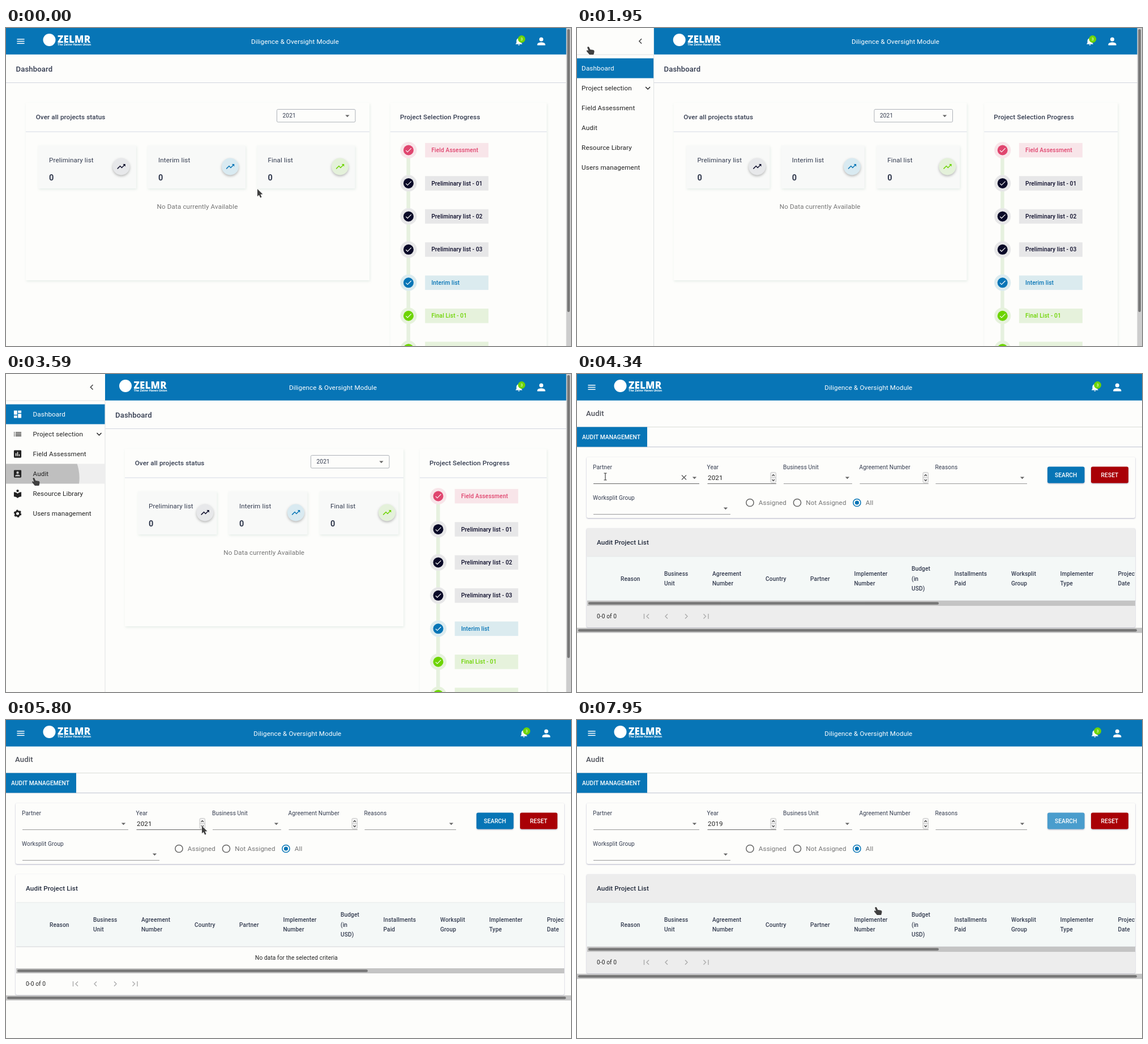
These frames come from a looping animation (998 px wide and 561 px high, 8000 ms). An HTML page:

```html
<!DOCTYPE html>
<html lang="en">
<head>
<meta charset="utf-8">
<title>Dashboard and audit list</title>
<style>
html, body { margin: 0; width: 100%; height: 100%; overflow: hidden; background: #fdfdfb; }
#stage { display: block; width: 998px; height: 561px; }
text { font-family: Roboto, "Liberation Sans", sans-serif; letter-spacing: .009em; white-space: pre; }
.card { filter: drop-shadow(1px 2px 2px #3c78641f); }
.raised { filter: drop-shadow(0 2px 2px #0004); }
.panel { filter: drop-shadow(0 1px 1px #50508070); }
</style>
</head>
<body>
<svg id="stage" viewBox="0 0 998 561"></svg>
<script>
const LOOP = 8000, BLUE = '#0775b6', INK = '#343c50', GREY = '#757575', PAGE = '#fdfdfb';
const PINK = '#e0466f', NAVY = '#0a0a28', GREEN = '#6dd400';
const MID = 'text-anchor="middle"', CAPS = 'letter-spacing=".3"';
const OPEN_AT = 1660, AUDIT_AT = 4270, DATA_AT = 4900, EMPTY_AT = 5700, RELOAD_AT = 7400;

const ICON = {
  menu: 'M3 18h18v-2H3zM3 13h18v-2H3zM3 6v2h18V6z',
  bell: 'M12 22c1.1 0 2-.9 2-2h-4c0 1.1.9 2 2 2zm6-6v-5c0-3.1-1.6-5.6-4.5-6.3V4a1.5 1.5 0 0 0-3 0v.7C7.6 5.4 6 7.9 6 11v5l-2 2v1h16v-1z',
  person: 'M12 12a4 4 0 1 0 0-8 4 4 0 0 0 0 8zm0 2c-2.7 0-8 1.3-8 4v2h16v-2c0-2.7-5.3-4-8-4z',
  trend: 'M16 6l2.3 2.3-4.9 4.9-4-4L2 16.6 3.4 18l6-6 4 4 6.3-6.3L22 12V6z',
  check: 'M9 16.2L4.8 12l-1.4 1.4L9 19 21 7l-1.4-1.4z',
  drop: 'M7 10l5 5 5-5z',
  tiles: 'M3 13h8V3H3zm0 8h8v-6H3zm10 0h8V11h-8zm0-18v6h8V3z',
  list: 'M3 13h2v-2H3zM3 17h2v-2H3zM3 9h2V7H3zM7 13h14v-2H7zM7 17h14v-2H7zM7 7v2h14V7z',
  chart: 'M19 3H5a2 2 0 0 0-2 2v14c0 1.1.9 2 2 2h14a2 2 0 0 0 2-2V5a2 2 0 0 0-2-2zM9 17H7v-7h2zm4 0h-2V7h2zm4 0h-2v-4h2z',
  account: 'M3 5v14c0 1.1.9 2 2 2h14a2 2 0 0 0 2-2V5a2 2 0 0 0-2-2H5a2 2 0 0 0-2 2zm12 4a3 3 0 1 1-6 0 3 3 0 0 1 6 0zm-9 8c0-2 4-3.1 6-3.1s6 1.1 6 3.1v1H6z',
  book: 'M12 11.6C9.6 9.4 6.5 8 3 8v11c3.5 0 6.6 1.4 9 3.6 2.4-2.2 5.5-3.6 9-3.6V8c-3.5 0-6.6 1.4-9 3.6zM12 8a3 3 0 1 0 0-6 3 3 0 0 0 0 6z'
};
const CURSOR = {
  arrow: 'M0 0v13l3-2.4 2.3 4.8 2.3-1.1-2.2-4.7 4.1-.3z',
  hand: 'M-1.2 2c-1.3 0-1.8 1-1.4 2.1L-.8 9l-1.6-.6c-1.6-.5-2.3.9-1.2 2L1 16h7.3l1.2-4.6c.4-2-.4-3.3-1.8-3.6L2.4 7 .4 3.1C0 2.3-.5 2-1.2 2z'
};
const MENU = ['Dashboard', 'Project selection', 'Field Assessment', 'Audit', 'Resource Library', 'Users management'];
const MENU_ICON = ['tiles', 'list', 'chart', 'account', 'book'];
const STEPS = [
  ['Field Assessment', PINK, '#f8e5e9'], ['Preliminary list - 01', NAVY, '#e7e7e8'],
  ['Preliminary list - 02', NAVY, '#e7e7e8'], ['Preliminary list - 03', NAVY, '#e7e7e8'],
  ['Interim list', BLUE, '#dbebef'], ['Final List - 01', GREEN, '#e6f2dc'], ['Final List - 02', GREEN, '#e6f2dc']
];
const COLUMNS = [
  [77, 'Reason'], [154, 'Business|Unit'], [239, 'Agreement|Number'], [333, 'Country'], [412, 'Partner'],
  [489.5, 'Implementer|Number'], [591, 'Budget|(in|USD)'], [666.5, 'Installments|Paid'],
  [767, 'Worksplit|Group'], [853.5, 'Implementer|Type'], [955.5, 'Project|Date']
];
const REASON = 'Project|below Risk|Threshold';
const ROWS = [
  [REASON, 'AFG01', '893', '', 'TAVORI|REVITALIZATION|FELLOWSHIPS|FOR|VELMORISTAN', '1001019', '$0.00', '$0.00', 'Group K', 'LOCALNGO'],
  [REASON, 'AFG01', '894', '', 'UNION OF|NEIGHBOURLY|RESTORATION,|VELMORISTAN', '1001041', '$0.00', '$0.00', 'Group K', 'LOCALNGO']
];
const PATH = [
  [0, 444, 284], [770, 444, 284], [1440, 21, 31], [2680, 21, 31], [3430, 50, 181], [4270, 50, 181],
  [5050, 51.5, 183], [5200, 51.5, 183], [5680, 346, 187], [6430, 346, 187], [6900, 773, 215],
  [7160, 860, 183], [7300, 860, 183], [7900, 529, 328]
];

// SVG helpers; text is placed by its vertical middle
const rect = (x, y, w, h, fill, more = '') => `<rect x="${x}" y="${y}" width="${w}" height="${h}" fill="${fill}" ${more}/>`;
const circle = (x, y, r, fill, more = '') => `<circle cx="${x}" cy="${y}" r="${r}" fill="${fill}" ${more}/>`;
const text = (x, y, s, size = 11.7, fill = INK, weight = 400, more = '') =>
  `<text x="${x}" y="${y + size * .355}" font-size="${size}" fill="${fill}" font-weight="${weight}" ${more}>${s.replace('&', '&amp;')}</text>`;
const lines = (x, y, s, gap, weight) => s.split('|').map((line, i, all) =>
  text(x, y + (i - (all.length - 1) / 2) * gap, line, 10.2, INK, weight)).join('');
const icon = (x, y, name, fill, k = .73) =>
  `<path transform="translate(${x} ${y}) scale(${k}) translate(-12 -12)" d="${ICON[name]}" fill="${fill}" fill-rule="evenodd"/>`;
const stroke = (d, color, width = 1.5) => `<path d="${d}" fill="none" stroke="${color}" stroke-width="${width}"/>`;
const hline = (x, y, w, color, h = 1) => rect(x, y - h / 2, w, h, color);
const mix = (a, b, p) => a + (b - a) * p;
const clamp = u => Math.max(0, Math.min(1, u));
const ease = u => { u = clamp(u); return u * u * (3 - 2 * u); };

function pointer(t) {
  const i = PATH.findIndex(k => k[0] > t);
  if (i < 0) return PATH[PATH.length - 1].slice(1);
  const [a, b] = [PATH[i - 1], PATH[i]], p = ease((t - a[0]) / (b[0] - a[0]));
  return [mix(a[1], b[1], p), mix(a[2], b[2], p)];
}

function header(p, shift) {
  const x = mix(65, 199.5, p), bell = 906 + shift;
  return rect(175 * p, 0, 998, 46.7, BLUE) +
    circle(x + 11.5, 21, 11, '#fff') +
    text(x + 26, 19.5, 'ZELMR', 17, '#fff', 800, 'style="font-family:Open Sans,sans-serif"') +
    text(x + 26, 29, 'The Zelmr Haven Union', 5.5, '#fff', 700) +
    text(mix(510.5, 577.5, p) + shift / 2, 23.5, 'Diligence & Oversight Module', 11.7, '#fff', 400, MID) +
    icon(bell, 23.5, 'bell', '#fff') + circle(bell + 4.8, 19.5, 6.4, GREEN) +
    text(bell + 4.8, 19.5, '3', 7.5, '#fff', 400, MID) +
    icon(bell + 39.5, 23.5, 'person', '#fff', .88) + (p ? '' : icon(26, 23.5, 'menu', '#fff'));
}

const scrollbar = end => rect(989.5, 0, 9, 561, '#cdcdcd') + rect(991.3, 2, 4.7, end - 2, '#777', 'rx="2.3"');
const hscroll = (x, y, w, thumb) => rect(x, y, w, 9, '#c4c4c4') + rect(x + 2, y + 2.2, thumb, 4.6, '#777', 'rx="2.3"');

function dashboard(p) {
  const m = (a, b) => mix(a, b, p);
  const left = m(35, 210), right = m(642, 702), side = m(679, 731), dot = m(711, 763.5), sel = m(478, 538);
  let s = text(m(17.5, 193), 72.5, 'Dashboard', 13.15, INK, 500) + hline(175 * p, 96.5, 989, '#d2d5de') +
    rect(left, 132, right - left, 313, PAGE, 'class="card"') +
    text(left + 17.7, 157, 'Over all projects status', 11.7, INK, 500) + hline(left, 183, right - left, '#d6dae6') +
    rect(sel + .5, 143.5, 138.5, 22.5, PAGE, 'stroke="#adb2b8" rx="2"') + text(sel + 10.5, 154.7, '2021', 10.2) +
    icon(sel + 125, 155, 'drop', '#666');
  const stats = [
    ['Preliminary list', 57, 233, 203.5, 351.5, NAVY, '#e7e8ea'],
    ['Interim list', 250, 393, 396, 512, BLUE, '#d9eaf1'],
    ['Final list', 443.5, 554, 590, 673, GREEN, '#e4f1da']
  ];
  for (const [name, x0, x1, c0, c1, color, tint] of stats) {
    const x = m(x0, x1), c = m(c0, c1);
    s += rect(x, 207, m(173, 139.5), 76, '#f8f9f8', 'class="card"') + text(x + 19, 233.2, name) +
      text(x + 19, 263.8, '0', 14.6, INK, 700) + circle(c, 244.5, 15, tint, 'class="raised"') + icon(c, 244.5, 'trend', color);
  }
  s += text(m(338, 455.7), 315, 'No Data currently Available', 11.7, GREY, 400, MID) +
    rect(side, 132, 955 - side, 440, PAGE, 'class="card"') +
    text(side + 17, 157, 'Project Selection Progress', 11.7, INK, 500) + hline(side, 183, 955 - side, '#d6dae6') +
    rect(dot - 3.5, 216, 6.5, 350, '#e6f1df');
  STEPS.forEach(([name, color, tint], i) => {
    const y = 215.5 + i * 58.45;
    s += circle(dot, y, 14.6, tint) + circle(dot, y, 9, color) + icon(dot, y, 'check', '#fff', .58) +
      rect(dot + 29.2, y - 12.7, 112, 25.5, tint) + text(dot + 40.4, y, name, 10.2, color, 500);
  });
  return s;
}

function sidebar(t, y) {
  let s = rect(0, 0, 175, 561, PAGE) + hline(0, 47, 175, '#dfe2e2') + rect(174.5, 47, 1, 514, '#dfe2e2') +
    stroke('M153.5 19l-4.2 4.3 4.2 4.3', '#444');
  const over = t > 2680 && y > 53.5 ? Math.floor((y - 53.5) / 35) : 0;
  if (over) s += rect(0, 53.5 + over * 35, 174.5, 35, '#eeeeee');
  if (t > 3490 && t < 3970) {
    const r = 12 + 66 * (t - 3490) / 100, fade = .2 * (1 - clamp((t - 3720) / 250));
    s += `<svg y="158.5" width="174.5" height="35">${circle(51, 25, r, '#000', `opacity="${fade}"`)}</svg>`;
  }
  MENU.forEach((name, i) => {
    const cy = 71 + i * 35.05, color = i ? '#222' : '#fff';
    if (!i) s += rect(0, 53.5, 174.5, 35, BLUE);
    s += text(47.5, cy, name, 11.7, color);
    s += MENU_ICON[i] ? icon(20.5, cy, MENU_ICON[i], color) :
      circle(20.5, cy, 4, 'none', `stroke="${color}" stroke-width="3"`) +
      circle(20.5, cy, 5.8, 'none', `stroke="${color}" stroke-width="2" stroke-dasharray="3.2 2.87"`);
  });
  return s + stroke('M160.5 104l4 4 4-4', '#222');
}

const stepper = x => rect(x, 173.5, 9.5, 18.5, '#f1f1f1', 'stroke="#bbb" stroke-width=".8" rx="2"') + hline(x, 182.8, 9.5, '#bbb', .8) +
  stroke(`M${x + 2.6} 179.8l2.2-2.2 2.2 2.2M${x + 2.6} 186.2l2.2 2.2 2.2-2.2`, '#333', 1.2);

function filters(t) {
  const year = t < 6000 ? '2021' : t < 6220 ? '2020' : '2019', focus = t < 5300;
  const fields = [['Partner', 28, 216, 164], ['Year', 229.5, 352, 164], ['Business Unit', 364, 486, 164],
    ['Agreement Number', 498.5, 621, 164], ['Reasons', 632.5, 795, 164], ['Worksplit Group', 28, 271, 218]];
  let s = rect(17, 146.5, 969, 107.5, PAGE, 'rx="3" class="panel"');
  fields.forEach(([name, x, end, y], i) => {
    const dark = i == 1 || (!i && focus);
    s += text(x, y + .5, name, 10.2) + hline(x + 1, y + 29.5, end - x - 1, dark ? '#666' : '#999');
    s += i == 1 || i == 3 ? stepper(end - 10) : icon(end - 8.5, y + 19, 'drop', '#666');
  });
  s += text(231, 182.5, year, 11.7, '#222');
  if (focus) s += stroke('M185 178.5l8 8m0-8l-8 8', '#555', 1.2);
  [['Assigned', 305.5], ['Not Assigned', 389], ['All', 494.5]].forEach(([name, x], i) => {
    const color = i == 2 ? BLUE : '#666';
    s += circle(x, 227, 6.6, 'none', `stroke="${color}" stroke-width="1.5"`) + (i == 2 ? circle(x, 227, 3.6, color) : '') +
      text(x + 15.3, 226.5, name, 11.7, GREY);
  });
  return s + rect(831, 163.5, 65.5, 29, t > 7100 ? '#4a9dcd' : BLUE, 'rx="3" class="panel"') +
    text(863.7, 178.3, 'SEARCH', 10.2, '#fff', 500, MID + ' ' + CAPS) +
    rect(908, 163.5, 66, 29, '#a90006', 'rx="3" class="panel"') + text(941, 178.3, 'RESET', 10.2, '#fff', 500, MID + ' ' + CAPS);
}

function table(t, filled, loading) {
  const top = filled ? 290 : 272, head = top + 50, base = loading ? '#ededed' : PAGE;
  const bottom = filled ? 580 : loading ? 447 : 485, width = filled ? 960 : 969;
  const colX = i => COLUMNS[i][0] + (filled ? (i < 5 ? 17.5 : 42.3) : 0);
  let s = rect(17, top, 969, bottom - top, base, 'rx="3" class="panel"') +
    text(35, top + 24.7, 'Audit Project List', 11.7, '#222a3c', 500);
  if (filled) {
    ROWS.forEach((row, r) => {
      const y = r ? 535.5 : 459;
      s += stroke(`M58 ${y - 3.5}l4 4 4-4`, '#333', 1.7) +
        row.map((cell, i) => lines(colX(i), y, cell, 11.7, 400)).join('');
    });
    const turn = 140 + (t - 5120) * 360 / 1400;
    s += hline(18, 500, width, '#888') +
      circle(515, 563, 18.2, 'none', `stroke="#5560c8" stroke-width="2.7" stroke-dasharray="31.8 200" transform="rotate(${turn} 515 563)"`);
  }
  s += rect(17.5, head, width - .5, 78, '#f4f8f7') + hline(18, head, width, '#e6eaea') + hline(18, head + 78, width, '#d3d6d8') +
    '<svg width="985.5" height="561">' +
    COLUMNS.slice(0, filled ? 10 : 11).map(([, name], i) => lines(colX(i), head + 39, name, 17.5, 500)).join('') + '</svg>';
  if (filled) return s + rect(977, 290, 9, 280, '#c4c4c4') + rect(979.2, 292, 4.7, 280, '#777', 'rx="2.3"');
  if (!loading) s += text(513, 419.5, 'No data for the selected criteria', 10.2, '#222', 400, MID);
  const y = bottom - 19.5, grey = '#aaa';
  return s + hscroll(18, bottom - 47, 968, 619) + text(35, y, '0-0 of 0', 10.2, '#222') +
    stroke(`M118.5 ${y - 4.5}v9M127 ${y - 4}l-4 4 4 4M160 ${y - 4}l-4 4 4 4M191 ${y - 4}l4 4-4 4M223.5 ${y - 4}l4 4-4 4M232 ${y - 4.5}v9`, grey, 1.4) +
    hscroll(0, bottom + .7, 998, 987);
}

function audit(t) {
  const filled = t >= DATA_AT && t < EMPTY_AT, loading = t < EMPTY_AT || t >= RELOAD_AT;
  return text(16, 69.5, 'Audit', 13.15, '#50535c', 500) + hline(0, 93.5, 998, '#d9dcd9') + hline(0, 128.7, 998, '#bfc2d2') +
    rect(0, 93.5, 124, 35, BLUE) + text(9, 111, 'AUDIT MANAGEMENT', 10.2, '#fff', 500, CAPS) +
    filters(t) + table(t, filled, loading) + header(0, filled ? 0 : 8.8) + (filled ? scrollbar(395) : '');
}

function cursor(t, x, y) {
  let kind = 'arrow';
  if (t > 1390 && t < 2490 || t > 2680 && t < AUDIT_AT && y > 53.5 || t > 7100) kind = 'hand';
  const beam = t >= AUDIT_AT && t < 5640;
  const shape = beam ? stroke('M-2.5 -6h2l.5.5.5-.5h2M0 -6v12M-2.5 6h2l.5-.5.5.5h2', '#333', 1.1) :
    `<path d="${CURSOR[kind]}" fill="#404040" stroke="#fff" stroke-width=".8" paint-order="stroke"/>`;
  return `<g transform="translate(${x} ${y})">${shape}</g>`;
}

function scene(t) {
  const [x, y] = pointer(t);
  let s = rect(0, 0, 998, 561, PAGE);
  if (t >= AUDIT_AT) s += audit(t);
  else {
    const p = ease((t - OPEN_AT) / 420);
    s += dashboard(p) + header(p, 0) + scrollbar(501);
    if (!p && t > 1390) s += circle(26, 23.5, 17.5, '#000', 'opacity=".04"');
    if (p) s += `<g transform="translate(${175 * (p - 1)} 0)">${sidebar(t, y)}</g>`;
  }
  return s + cursor(t, x, y);
}

const stage = document.getElementById('stage'), start = performance.now();
let shown = '';
function frame() {
  const next = scene((performance.now() - start) % LOOP);
  if (next !== shown) stage.innerHTML = shown = next;
  requestAnimationFrame(frame);
}
frame();
</script>
</body>
</html>
```
